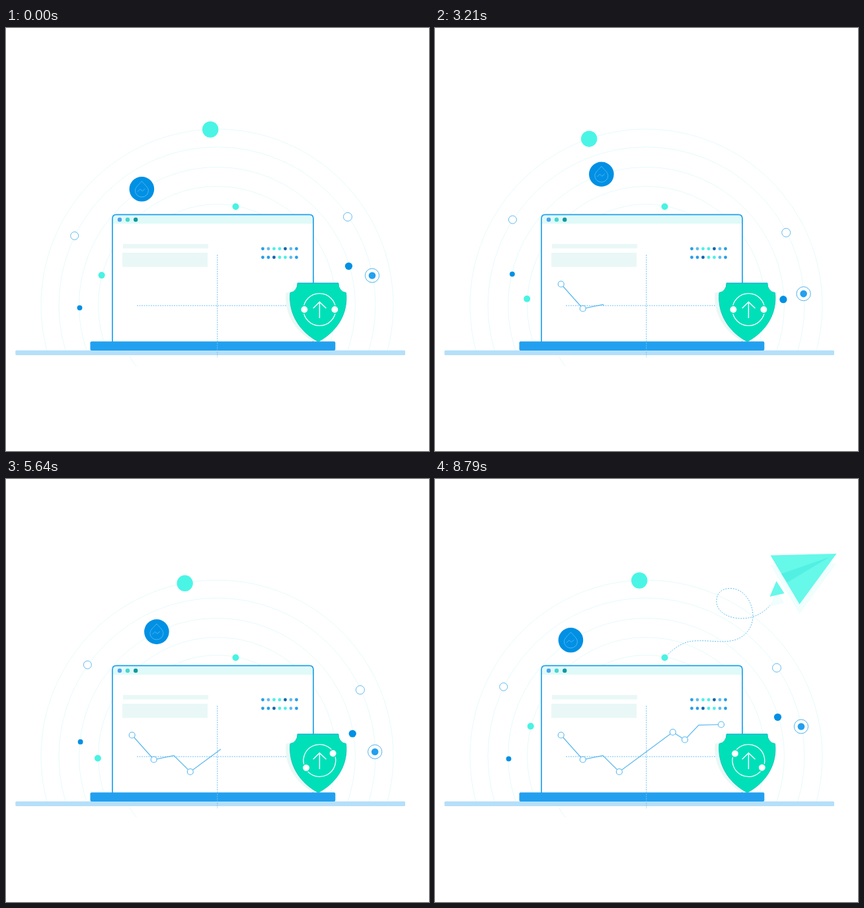
Animation of 640 by 640 pixels, one loop 8.87 s. Source, as an HTML page:

```html
<!DOCTYPE html>
<html lang="en">
<head>
<meta charset="utf-8">
<title>Laptop growth chart</title>
<style>
html, body { margin: 0; width: 100%; height: 100%; overflow: hidden; background: #fff; }
svg { display: block; width: 100vw; height: 100vh; }
</style>
</head>
<body>
<svg viewBox="0 0 640 640" fill="none">
  <defs>
    <clipPath id="aboveDesk"><rect width="640" height="488"/></clipPath>
    <mask id="trailMask" maskUnits="userSpaceOnUse" x="0" y="0" width="640" height="640">
      <path id="trailReveal" pathLength="1" stroke="#fff" stroke-width="5"/>
    </mask>
    <path id="shieldShape" d="M441 386H503A12.5 13.5 0 0 0 514.5 400.5C518 433 500 460 472.5 474.5C445 460 427 433 430 400.5A12.5 13.5 0 0 0 441 386Z"/>
    <g id="planeShape">
      <path d="M507.5 115.5L607.5 113L551.5 189.5Z"/>
      <path d="M516.5 154.5L528.5 173L506.5 178Z"/>
    </g>
  </defs>

  <g id="rings" stroke="#e6fbfa" clip-path="url(#aboveDesk)"></g>
  <path d="M187 496.5Q191 504.5 197.5 512" stroke="#e6fbfa"/>
  <g id="orbiters"></g>

  <path id="trail" stroke="#5fbcf0" stroke-dasharray="2 1.8" mask="url(#trailMask)"/>
  <circle cx="347.5" cy="270.3" r="5" fill="#48f3e3"/>
  <g id="plane">
    <use href="#planeShape" y="14.5" fill="#f0fefd"/>
    <use href="#planeShape" fill="#66f8e9"/>
    <path d="M524 143.5L597 118L533 156.5Z" fill="#52f0e2"/>
  </g>

  <rect x="161" y="282.3" width="304" height="200" rx="6" fill="#fff"/>
  <path d="M162 296V288Q162 283 167 283H459Q464 283 464 288V296Z" fill="#dffaf8"/>
  <path d="M161 475V288.3Q161 282.3 167 282.3H459Q465 282.3 465 288.3V475" stroke="#229fec" stroke-width="1.7"/>
  <circle cx="172" cy="290" r="3.2" fill="#4ea4f0"/>
  <circle cx="184" cy="290" r="3.2" fill="#48d6d0"/>
  <circle cx="196.2" cy="290" r="3.2" fill="#0e9a9f"/>
  <path d="M177 326.7H306V333.5H177ZM176 340H305V361.5H176Z" fill="#e9f8f6"/>
  <g id="dotGrid"></g>

  <rect x="14.3" y="487.7" width="589.7" height="7.4" rx="1.5" fill="#b5dff9"/>
  <rect x="127.5" y="474.2" width="370.8" height="13.8" rx="2" fill="#22a0ef"/>
  <path d="M198 420H424M319.8 343V498" stroke="#6fc1f3" stroke-dasharray="2 1.5"/>

  <path id="chart" stroke="#5ab8ef" stroke-width="1.2"/>
  <g id="markers" fill="#fff" stroke="#5ab8ef" stroke-width="1.1"></g>

  <use href="#shieldShape" x="-6.5" fill="#e9f8f5"/>
  <circle cx="430.5" cy="389" r="11" fill="#fff" opacity=".6"/>
  <use href="#shieldShape" fill="#00e0b8" stroke="#0cc8bd"/>
  <path d="M441 386.2H503" stroke="#22a8e4"/>
  <g id="spinner">
    <circle cx="474.4" cy="426" r="24.4" stroke="#fff" stroke-width="1.3"/>
    <g fill="#fff" stroke="#00e0b8" stroke-width="1.5">
      <circle cx="451.4" cy="426" r="5.7"/>
      <circle cx="497.4" cy="426" r="5.7"/>
    </g>
  </g>
  <path d="M474.4 439V414.5M464.8 424L474.4 414.5L484.4 424" stroke="#fff" stroke-width="1.5"/>
</svg>
<script>
const LOOP = 8870, FPS = 14, LAST = 123;
const CX = 319.5, CY = 419.5;
const $ = id => document.getElementById(id);
const clamp = v => Math.max(0, Math.min(1, v));

function add(parent, tag, attrs) {
  const node = document.createElementNS('http://www.w3.org/2000/svg', tag);
  for (const key in attrs) node.setAttribute(key, attrs[key]);
  return parent.appendChild(node);
}

for (const r of [266.5, 239.5, 209, 180, 153]) add($('rings'), 'circle', { cx: CX, cy: CY, r });

// Swings out and back at constant speed; rate in degrees per second
const outer = { start: 0, end: 7250, rate: -5.2 };
const third = { start: 0, end: 7250, rate: 4.4 };
const second = { start: 1225, end: 8390, rate: 3.36 };
const fourth = { start: 1200, end: 8360, rate: -5.7 };
const orbiters = [];

function orbiter(swing, x, y, ...discs) {
  const node = add($('orbiters'), 'g', {});
  for (const [r, fill, stroke = 'none'] of discs) add(node, 'circle', { r, fill, stroke });
  orbiters.push({ swing, x: x - CX, y: y - CY, node });
  return node;
}
orbiter(outer, 309.2, 153.5, [12.2, '#4af5e6']);
const drop = orbiter(third, 205.4, 243.8, [18.8, '#0090e4']);
add(drop, 'path', {
  d: 'M0-12C4-7 10-3 10 2.3A10 9.7 0 0 1-10 2.3C-10-3-4-7 0-12ZM-6.5 4L-2.5 0L1 3L5 -.5',
  stroke: '#58b9f2', 'stroke-width': .9
});
orbiter(third, 518.5, 360.3, [5.6, '#0090e4']);
orbiter(third, 111.5, 423.3, [3.9, '#0090e4']);
orbiter(second, 103.7, 314.4, [6, '#fff', '#62bbef']);
orbiter(second, 517, 285.7, [6.5, '#fff', '#62bbef']);
orbiter(second, 554, 374.5, [10.6, '#fff', '#4fb2ee'], [5.3, '#22a0ef']);
orbiter(fourth, 144.7, 374.1, [5, '#48f3e3']);

const dotColors = { b: '#279fe9', l: '#5fbcf0', c: '#4af2e3', d: '#0d63ad' };
['blccdlb', 'bbdcclb'].forEach((row, j) => [...row].forEach((key, i) =>
  add($('dotGrid'), 'circle', { cx: 388.5 + 8.5 * i, cy: 334 + 13 * j, r: 2.4, fill: dotColors[key] })));

const trailPath = 'M347.5 270.3C365 252 378 245.5 395 244.8C420 244 430 248 450 244.5C470 240 481 224 481 207' +
  'C481 190 470 165.5 446 165.5C432 165.5 425 175 426 187C428 204 448 211 463 211C484 211 498 202 510 188';
$('trail').setAttribute('d', trailPath);
$('trailReveal').setAttribute('d', trailPath);

$('chart').setAttribute('d', 'M190.7 387.5L223.7 424.5L254 418.3L278.8 443L359.8 383L378 394.5L399 372.3L433 371.5');
const markers = [[190.7, 387.5, 1], [223.7, 424.5, 49], [278.8, 443, 115], [359.8, 383, 216],
  [378, 394.5, 238.5], [433, 371.5, 301]]
  .map(([cx, cy, at]) => ({ at, node: add($('markers'), 'circle', { cx, cy, r: 4.5 }) }));
const chartKeys = [[960, 0], [1000, 10], [2430, 50], [3930, 112.5], [5640, 173], [7290, 238], [8780, 304]];

function chartLength(t) {
  for (let i = 1; i < chartKeys.length; i++) {
    const [t0, a] = chartKeys[i - 1], [t1, b] = chartKeys[i];
    if (t < t1) return a + (b - a) * clamp((t - t0) / (t1 - t0));
  }
  return 304;
}

function draw(t) {
  for (const { swing, x, y, node } of orbiters) {
    const elapsed = Math.max(0, Math.min(t - swing.start, swing.end - t)) / 1000;
    const a = swing.rate * elapsed * Math.PI / 180, c = Math.cos(a), s = Math.sin(a);
    node.setAttribute('transform', `translate(${CX + x * c - y * s} ${CY + x * s + y * c})`);
  }

  const length = chartLength(t);
  $('chart').setAttribute('stroke-dasharray', `${length} 1000`);
  $('chart').style.display = length ? '' : 'none';
  for (const { at, node } of markers) node.style.display = length >= at ? '' : 'none';

  const spin = Math.max(0, t - 3620) * 0.075;
  $('spinner').setAttribute('transform', `rotate(${spin} 474.4 426)`);

  const reveal = clamp((t - 6300) / 1740);
  $('trailReveal').setAttribute('stroke-dasharray', `${reveal} 2`);
  $('trail').style.display = reveal ? '' : 'none';
  $('plane').setAttribute('opacity', clamp((t - 7950) / 350));
}

function tick() {
  const step = Math.min(LAST, Math.floor((performance.now() % LOOP + 5) * FPS / 1000));
  draw(step * 1000 / FPS);
  requestAnimationFrame(tick);
}
tick();
</script>
</body>
</html>
```
